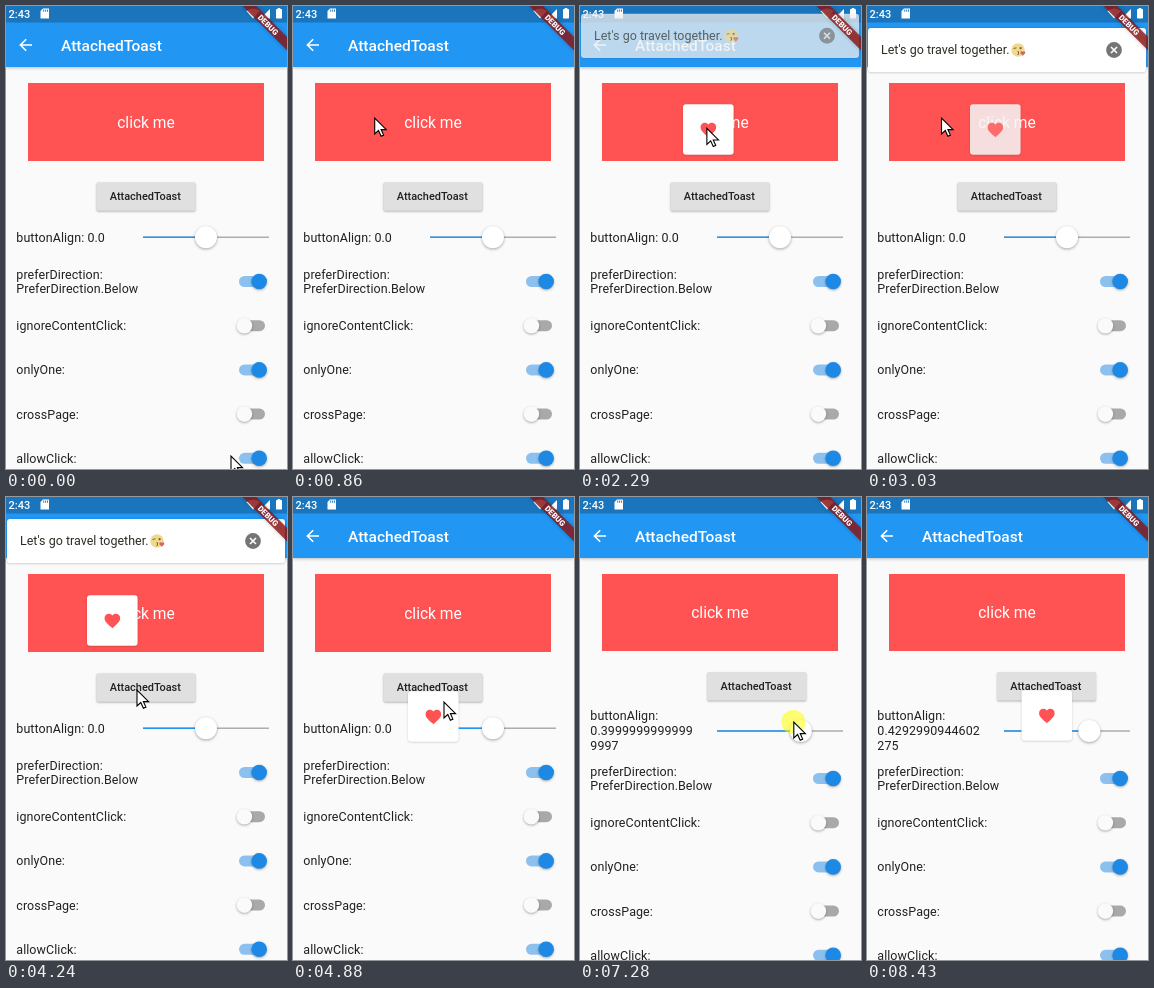
Write an HTML page with a canvas that moves like this. It is 281 px wide and 463 px high and loops after 8.87 s.

```html
<!DOCTYPE html>
<html lang="en">
<head>
<meta charset="utf-8">
<title>AttachedToast</title>
<style>
html, body { margin: 0; width: 100%; height: 100%; overflow: hidden; background: #fafafa; }
canvas { display: block; width: 281px; height: 463px; }
</style>
</head>
<body>
<canvas id="stage"></canvas>
<script>
const W = 281, H = 463, LOOP = 8870, DWELL = 50, FADE = 120;
const BLUE = '#2196f3', RED = '#ff5252', INK = '#212121', STATUS = '#1a75bc';
const canvas = document.getElementById('stage');
const dpr = window.devicePixelRatio || 1;
canvas.width = W * dpr;
canvas.height = H * dpr;
const g = canvas.getContext('2d');

const heartIcon = new Path2D('M12 21.35l-1.45-1.32C5.4 15.36 2 12.28 2 8.5 2 5.42 4.42 3 7.5 3c1.74 0 3.41.81 4.5 2.09C13.09 3.81 14.76 3 16.5 3 19.58 3 22 5.42 22 8.5c0 3.78-3.4 6.86-8.55 11.54L12 21.35z');
const arrowIcon = new Path2D('M0 0V16L3.8 12.5L6.4 18.2L8.9 17.1L6.4 11.6H11.6Z');

const clamp = v => Math.max(0, Math.min(1, v));
const smooth = u => u * u * (3 - 2 * u);
const mix = (a, b, u) => a + (b - a) * smooth(clamp(u));

// The slider is dragged from one value to the next in even steps.
const DRAG_START = 5010, DRAG_STEP = 300;
const swings = [0, -0.92, 1, 0.2, -0.43945312499999967, -0.8, 0.9, -0.2, 1, 0.4292990944602275];
const DRAG_END = DRAG_START + DRAG_STEP * (swings.length - 1);

function sliderValue(t) {
  const p = Math.floor((t - DRAG_START) / DWELL) * DWELL / DRAG_STEP;
  if (p <= 0) return 0;
  if (p >= swings.length - 1) return swings[swings.length - 1];
  const i = Math.floor(p);
  return mix(swings[i], swings[i + 1], p - i);
}

const buttonX = v => 140 + 92 * v;

// Pointer stops; a tap on the card or the button opens a toast.
const stop = (t, x, y, hit) => ({ t, x, y, hit });
const cardTap = (t, x) => stop(t, x, 112, 'card');
const stops = [
  stop(0, 225, 450), cardTap(800, 81), cardTap(1070, 179), cardTap(1300, 128),
  stop(1470, 152, 109), stop(2120, 130, 123), cardTap(3010, 74.5), cardTap(3300, 184),
  cardTap(3560, 106), stop(4240, 131, 193), stop(4380, 134, 194, 'button'),
  stop(4880, 151, 205), stop(DRAG_START, 193, 225, 'slider'), stop(DRAG_END, 215, 225),
  stop(7910, 180, 190, 'button'), stop(8430, 252, 462)
];
const taps = stops.filter(s => s.hit);
const NOTICE_IN = 2150, NOTICE_OUT = 4370;

function pointerAt(t) {
  const i = stops.findLastIndex(s => t >= s.t);
  const a = stops[i], b = stops[i + 1] || a;
  const u = (t - a.t - DWELL) / (b.t - a.t - DWELL || 1);
  return [mix(a.x, b.x, u), mix(a.y, b.y, u)];
}

const visible = (t, from, to, fade) => clamp((t - from) / fade) * (1 - clamp((t - to) / fade));

function box(x, y, w, h, r, color) {
  g.fillStyle = color;
  g.beginPath();
  g.roundRect(x, y, w, h, r);
  g.fill();
}

function disc(x, y, r, color) {
  g.fillStyle = color;
  g.beginPath();
  g.arc(x, y, r, 0, 7);
  g.fill();
}

function raised(blur, dy, alpha, draw) {
  g.save();
  g.shadowColor = `rgba(0,0,0,${alpha})`;
  g.shadowBlur = blur * dpr;
  g.shadowOffsetY = dy * dpr;
  draw();
  g.restore();
}

function lines(color, width, ...paths) {
  g.strokeStyle = color;
  g.lineWidth = width;
  g.beginPath();
  paths.forEach(path => path.forEach(([x, y], i) => i ? g.lineTo(x, y) : g.moveTo(x, y)));
  g.stroke();
}

function poly(color, ...points) {
  g.fillStyle = color;
  g.beginPath();
  points.forEach(([x, y]) => g.lineTo(x, y));
  g.fill();
}

function icon(path, x, y, scale, color) {
  g.save();
  g.translate(x, y);
  g.scale(scale, scale);
  g.fillStyle = color;
  g.fill(path);
  g.restore();
}

function text(s, x, y, size, color = INK, weight = 400, align = 'left', spacing = 0) {
  g.font = `${weight} ${size}px Roboto, sans-serif`;
  g.letterSpacing = spacing + 'px';
  g.textAlign = align;
  g.textBaseline = 'alphabetic';
  g.fillStyle = color;
  g.fillText(s, x, y + size * 0.355);
}

const label = (s, y) => text(s, 10.3, y, 12.49, INK, 400, 'left', 0.07);

function toggle(y, on) {
  box(233, y - 5.5, 26, 11, 5.5, on ? '#8cc1ef' : '#a9a9a9');
  raised(2.5, 1, 0.32, () => disc(on ? 253.2 : 238.4, y, 7.8, on ? '#1e88e5' : '#fafafa'));
}

function appBar() {
  raised(3, 1, 0.25, () => box(0, 0, W, 61, 0, BLUE));
  lines('#fff', 1.6, [[26, 39], [15, 39]], [[20.2, 33.2], [14.4, 39], [20.2, 44.8]]);
  text('AttachedToast', 55, 39.3, 15.5, '#fff', 500);
}

function statusBar() {
  box(0, 0, W, 16.5, 0, STATUS);
  text('2:43', 2.5, 7.8, 11, '#fff', 500);
  poly('#fff', [37, 2.5], [43, 2.5], [43, 12.5], [34.5, 12.5], [34.5, 5]);
  for (let x = 37.3; x < 42; x += 1.9) box(x, 3.6, 0.9, 2.2, 0, STATUS);
  g.fillStyle = '#fff';
  g.beginPath();
  g.moveTo(247, 12.5);
  g.arc(247, 12.5, 10, -2.3, -0.84);
  g.fill();
  poly('#fff', [264, 3], [264, 12.5], [254.5, 12.5]);
  box(270, 3, 6, 9.5, 0.7, '#fff');
  box(271.7, 2, 2.6, 1.5, 0, '#fff');
}

function debugRibbon() {
  g.save();
  g.translate(W, 0);
  g.rotate(Math.PI / 4);
  raised(4, 0, 0.5, () => box(-32, 21.9, 64, 9.4, 0, 'rgba(0,0,0,.45)'));
  box(-32, 21.9, 64, 9.4, 0, 'rgba(183,28,28,.63)');
  text('DEBUG', 0, 26.7, 7.9, '#fff', 900, 'center');
  g.restore();
}

function toast(tap, i, t) {
  if (tap.hit === 'slider') return;
  const next = taps[i + 1];
  const a = visible(t, tap.t + 60, next ? next.t : LOOP, FADE);
  if (!a) return;
  const cx = tap.hit === 'card' ? tap.x : buttonX(sliderValue(tap.t));
  const top = tap.hit === 'card' ? 98 : tap.t < DRAG_START ? 194 : 193;
  g.save();
  g.globalAlpha = a;
  raised(2, 0.5, 0.22, () => box(cx - 25, top + 0.3, 50.6, 50.4, 3, '#fff'));
  icon(heartIcon, cx - 9, top + 16.5, 0.78, RED);
  g.restore();
}

function kissFace(x, y) {
  const brown = '#75602f';
  disc(x, y, 6.7, '#f0d88c');
  lines(brown, 1, [[x - 4.4, y - 1.5], [x - 1.6, y - 2.2]],
    [[x - 0.6, y + 1.6], [x + 1, y + 2.2], [x, y + 3], [x + 1, y + 3.8], [x - 0.6, y + 4.6]]);
  disc(x + 2.6, y - 1.8, 1.1, brown);
  icon(heartIcon, x + 1.8, y + 0.4, 0.25, '#cf6a62');
}

function notice(t) {
  const a = visible(t, NOTICE_IN, NOTICE_OUT, 200);
  if (!a) return;
  g.save();
  g.globalAlpha = a;
  g.translate(0, -68 * (1 - smooth(a)));
  raised(2, 0.5, 0.25, () => box(1, 22, 278, 44.2, 3, '#fff'));
  text("Let's go travel together.", 14, 44, 12.49, '#2c2c24');
  kissFace(151, 44);
  disc(247, 44, 7.9, '#757575');
  lines('#fff', 1.6, [[244, 41], [250, 47]], [[250, 41], [244, 47]]);
  g.restore();
}

function alignLabel(v) {
  if (!v) return label('buttonAlign: 0.0', 231.3);
  // wraps after fourteen digits
  const s = String(v), cut = v < 0 ? 16 : 15;
  ['buttonAlign:', s.slice(0, cut), s.slice(cut)].forEach((s, i) => label(s, 218.8 + i * 14.8));
}

function slider(v, y) {
  const x = 200 + 52 * v;
  box(137, y - 0.8, 126, 1.6, 0, '#adadad');
  box(137, y - 0.8, x - 137, 1.6, 0, BLUE);
  raised(3, 1, 0.35, () => disc(x, y, 11, '#fff'));
}

function page(v) {
  const moved = v !== 0, down = moved ? 6 : 0;
  const bx = buttonX(v), by = moved ? 175 : 176.2;
  box(0, 0, W, H, 0, '#fafafa');
  box(22, 77, 236, moved ? 77 : 78, 0, RED);
  text('click me', 140, moved ? 115.7 : 116.7, 15.6, '#fff', 400, 'center');
  raised(2, 1, 0.28, () => box(bx - 49.5, by, 99, 28.5, 1.6, '#e0e0e0'));
  text('AttachedToast', bx - 0.7, by + 14, 10.93, INK, 500, 'center');
  alignLabel(v);
  slider(v, moved ? 234 : 231.3);
  label('preferDirection:', 268.1 + down);
  label('PreferDirection.Below', 282.8 + down);
  toggle(275.5 + down, true);
  ['ignoreContentClick:', 'onlyOne:', 'crossPage:', 'allowClick:'].forEach((s, i) => {
    const y = 319.7 + i * 44.2 + down;
    label(s, y);
    toggle(y, i % 2 === 1);
  });
}

function cursor(t, v) {
  if (t >= 8430) return;
  let [x, y] = pointerAt(t);
  if (t >= DRAG_START && t < DRAG_END) {
    x = 193 + 52 * v;
    disc(x - 0.5, y, 12, 'rgba(255,255,0,.55)');
  }
  g.save();
  g.translate(x, y);
  g.fillStyle = '#fff';
  g.strokeStyle = '#000';
  g.lineWidth = 1.1;
  g.fill(arrowIcon);
  g.stroke(arrowIcon);
  g.restore();
}

function frame(now) {
  const t = now % LOOP;
  const v = sliderValue(t);
  g.setTransform(dpr, 0, 0, dpr, 0, 0);
  page(v);
  appBar();
  statusBar();
  taps.forEach((tap, i) => toast(tap, i, t));
  notice(t);
  debugRibbon();
  cursor(t, v);
  requestAnimationFrame(frame);
}
requestAnimationFrame(frame);
</script>
</body>
</html>
```
